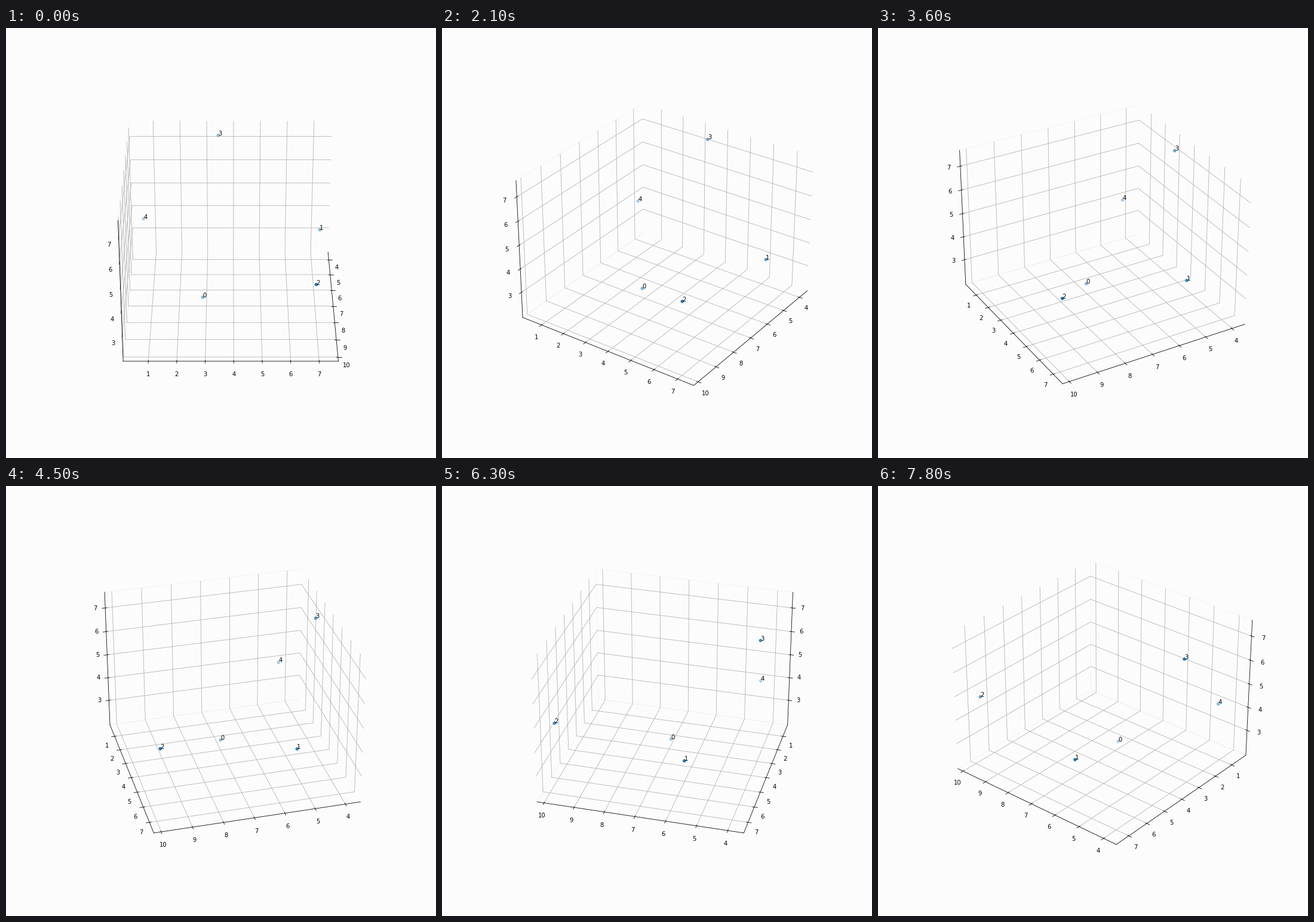
Recreate the animation shown at these times as a matplotlib script. Size 720 by 720 pixels, loop 8 s.

```python
import matplotlib.pyplot as plt
import numpy as np
from matplotlib.animation import FuncAnimation

BACKGROUND = "#fcfcfc"
TICKS_PER_STEP = 3      # animation ticks of 100 ms per turn
DEGREES_PER_STEP = 5

np.random.seed(123)
points = 10 * np.random.random_sample((5, 3))

plt.rcParams.update({"font.family": "DejaVu Sans", "font.size": 10})

fig = plt.figure(figsize=(10, 10), dpi=72, facecolor=BACKGROUND)
fig.subplots_adjust(left=0.125, right=0.9, bottom=0.125, top=0.88)
ax = fig.add_subplot(projection="3d", facecolor=BACKGROUND)

ax.scatter(*points.T)
for index, point in enumerate(points):
    ax.text(*point, str(index), size=10, color="k")

# Whole numbers that lie within the padded range of the data.
low, high = points.min(axis=0), points.max(axis=0)
padding = 0.05 * (high - low)
first, last = np.ceil(low - padding), np.floor(high + padding)
for axis, start, stop in zip((ax.xaxis, ax.yaxis, ax.zaxis), first, last):
    axis.set_ticks(np.arange(start, stop + 1))
    axis.set_pane_color((0.93, 0.93, 0.93, 0.5))
    axis.pane.set_fill(False)
ax.xaxis.pane.set_edgecolor("none")


def update(tick):
    azimuth = DEGREES_PER_STEP * (tick // TICKS_PER_STEP)
    # A tiny offset keeps the side wall on the left in the edge-on view.
    ax.view_init(elev=30, azim=max(azimuth, 1e-3))
    return []


anim = FuncAnimation(fig, update, frames=80, interval=100,
                     init_func=lambda: update(0), repeat=True,
                     repeat_delay=0, blit=False)
plt.show()
```
